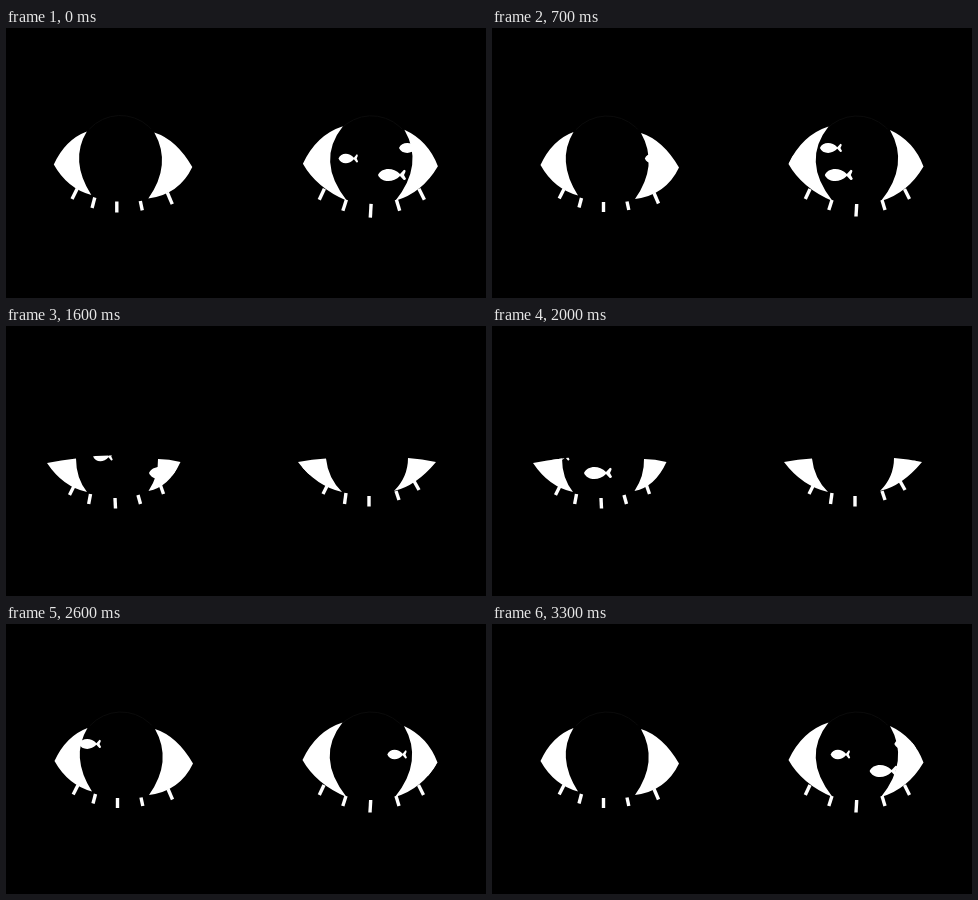
An HTML page with a canvas for the animation above (3400 ms loop, 480 by 270 pixels).

```html
<!DOCTYPE html>
<html lang="en">
<head>
<meta charset="utf-8">
<title>Fish eyes</title>
<style>
html, body { margin: 0; width: 100%; height: 100%; overflow: hidden; background: #000; }
canvas { display: block; width: 480px; height: 270px; }
</style>
</head>
<body>
<canvas id="stage" width="480" height="270"></canvas>
<script>
const ctx = document.getElementById('stage').getContext('2d');
const STEP = 100, COUNT = 34;
const SHUT_FROM = 15, SHUT_TO = 23;

// Corner points of one pose, with a control point for each curve between them.
const leftOpen = {
  tipL: [48.5, 137], upL: [60, 112], topL: [81.5, 104], inL: [64, 133], botL: [86, 167.5], lowL: [62, 161],
  tipR: [187, 139.5], upR: [171, 112], topR: [149, 105], inR: [167, 137], botR: [143, 171], lowR: [174, 167],
  brow: [115, 72],
  lashes: [[72, 161, 67.2, 170.5], [89.5, 170, 87, 179.5], [111.5, 174, 111.5, 184], [135, 173.5, 136.8, 182], [162, 165, 166.5, 175.5]]
};
const rightOpen = {
  tipL: [296.5, 136], upL: [310, 107], topL: [336.5, 98.5], inL: [309, 133], botL: [340.5, 173], lowL: [310, 160],
  tipR: [431.5, 138.5], upR: [422, 113], topR: [398, 102], inR: [418, 137], botR: [389, 173], lowR: [416, 165],
  brow: [366, 70],
  lashes: [[318, 161, 313.3, 171], [340, 172, 336.8, 182], [364.7, 176, 364, 188.5], [390, 172, 393, 182], [412.5, 161, 417.5, 171]]
};
const leftHalf = {
  tipL: [41, 137], upL: [55, 134], topL: [70, 132.5], inL: [70, 152], botL: [81, 166], lowL: [57, 161],
  tipR: [174.5, 136], upR: [163, 133], topR: [152, 133], inR: [152.5, 150], botR: [142.5, 165], lowR: [163, 161],
  brow: [111, 126],
  lashes: [[68, 160, 63.5, 169], [84.5, 168, 82.7, 178], [109, 172, 109.5, 182.5], [132, 169, 134.5, 178], [154, 158, 157.5, 168]]
};
const rightHalf = {
  tipL: [292, 136], upL: [306, 133], topL: [320, 132.5], inL: [322, 152], botL: [336, 166], lowL: [310, 160],
  tipR: [430, 136], upR: [416, 133], topR: [402, 132], inR: [402, 151], botR: [388, 165], lowR: [410, 160],
  brow: [361, 126],
  lashes: [[322, 158, 317, 168], [340, 167, 338.5, 178], [363, 170, 363, 180.5], [390, 165, 393, 174], [408, 155, 413, 164]]
};

// x is the nose at time `at` (in steps); every fish swims left by `speed` per step.
const kinds = {
  high:  { y: 120, sx: 0.79, sy: 0.85 },
  small: { y: 130.5, sx: 0.7, sy: 0.83 },
  large: { y: 147, sx: 1, sy: 1.05 }
};
const eyes = [
  { open: leftOpen, half: leftHalf, cx: 115, sway: [-0.7, -0.5], fish: [
    { kind: 'high', at: 26, x: 73, speed: 9.3 },
    { kind: 'small', at: 13, x: 109, speed: 7.3 },
    { kind: 'large', at: 20, x: 92, speed: 12.75 }
  ] },
  { open: rightOpen, half: rightHalf, cx: 365, sway: [0.4, -0.2], fish: [
    { kind: 'high', at: 0, x: 393, speed: 9.3 },
    { kind: 'small', at: 34, x: 332.5, speed: 6.1 },
    { kind: 'large', at: 0, x: 372, speed: 5.6 }
  ] }
];
const fishShape = new Path2D(
  'M0 0C3-7 15-8 22-1L26-5Q28-5 27.5-3L26 0 28 3.5Q27 5.5 25.5 4.5L22 1C15 8 3 7 0 0Z');

function curve(start, ...pairs) {
  const path = new Path2D();
  path.moveTo(...start);
  for (const [ctrl, end] of pairs) path.quadraticCurveTo(...ctrl, ...end);
  path.closePath();
  return path;
}

function build(p) {
  const under = [p.brow[0], 190];
  p.whites = [
    curve(p.tipL, [p.upL, p.topL], [p.inL, p.botL], [p.lowL, p.tipL]),
    curve(p.tipR, [p.upR, p.topR], [p.inR, p.botR], [p.lowR, p.tipR])
  ];
  p.outline = curve(p.tipL, [p.upL, p.topL], [p.brow, p.topR], [p.upR, p.tipR],
    [p.lowR, p.botR], [under, p.botL], [p.lowL, p.tipL]);
}
[leftOpen, rightOpen, leftHalf, rightHalf].forEach(build);

// Swimmers repeat once per loop; pick the pass nearest to the eye.
function noseAt(f, k) {
  let d = (k - f.at) % COUNT;
  if (d > COUNT / 2) d -= COUNT;
  if (d < -COUNT / 2) d += COUNT;
  return f.x - f.speed * d;
}

function drawEye(eye, k) {
  const half = k >= SHUT_FROM && k < SHUT_TO;
  const pose = half ? eye.half : eye.open;
  const sway = !half && (k + 2) % 6 < 3;
  ctx.save();
  if (sway) ctx.translate(...eye.sway);
  if (!half) {
    ctx.strokeStyle = '#0b0b0b';
    ctx.lineWidth = 1;
    ctx.beginPath();
    ctx.arc(eye.cx, 130, 42, -2.4, -0.75);
    ctx.stroke();
  }
  ctx.fillStyle = ctx.strokeStyle = '#fff';
  pose.whites.forEach(w => ctx.fill(w));
  ctx.lineWidth = 3.4;
  const grow = sway ? 1.1 : 1;
  for (const [x, y, x2, y2] of pose.lashes) {
    ctx.beginPath();
    ctx.moveTo(x, y);
    ctx.lineTo(x + (x2 - x) * grow, y + (y2 - y) * grow);
    ctx.stroke();
  }
  ctx.restore();

  ctx.save();
  ctx.clip(pose.outline);
  ctx.fillStyle = '#fff';
  for (const f of eye.fish) {
    const { y, sx, sy } = kinds[f.kind];
    ctx.save();
    ctx.translate(noseAt(f, k), y);
    ctx.scale(sx, sy);
    ctx.fill(fishShape);
    ctx.restore();
  }
  ctx.restore();
}

function draw(time) {
  const k = Math.floor(time / STEP) % COUNT;
  ctx.fillStyle = '#000';
  ctx.fillRect(0, 0, 480, 270);
  eyes.forEach(eye => drawEye(eye, k));
}

const begin = performance.now();
function tick() {
  draw(performance.now() - begin);
  requestAnimationFrame(tick);
}
tick();
</script>
</body>
</html>
```
